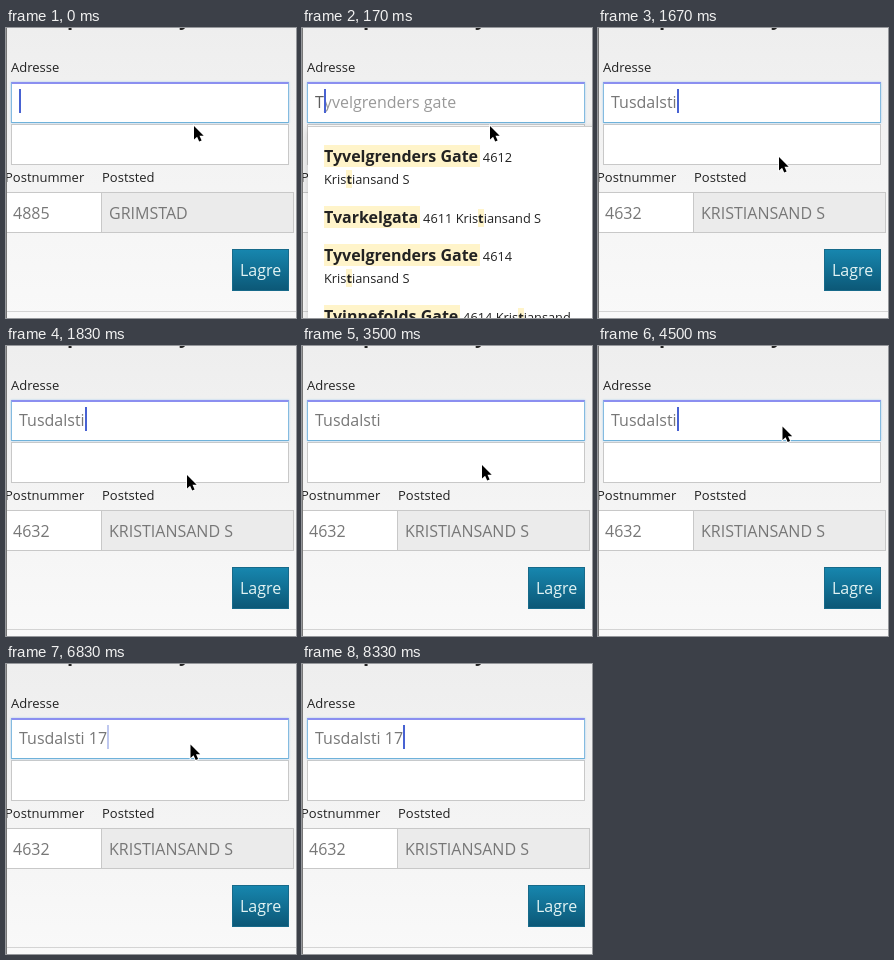
An HTML page for the animation above (8.67 s loop, 290 by 290 pixels).

```html
<!DOCTYPE html>
<html lang="no">
<head>
<meta charset="utf-8">
<title>Adresse</title>
<style>
html, body { margin: 0; width: 100%; height: 100%; overflow: hidden; }
#stage {
  position: relative; width: 290px; height: 290px; overflow: hidden;
  background: linear-gradient(#eee, #f9f9f9);
  font: 16px/22px "Open Sans", sans-serif; color: #222; white-space: pre;
}
#stage > *, .row { position: absolute; box-sizing: border-box; }
.title { top: -21px; font-size: 20px; }
.label { font-size: 13px; line-height: 18px; }
.box { border: 1px solid #c8c8c8; background: #fff; color: #777; padding: 9px 7px; height: 41px; }
#street {
  left: 5px; top: 54px; width: 278px; padding: 7px 7px 9px; border-color: #8b8ff0 #84bbe0 #6fb2da;
  border-top-width: 2px; box-shadow: 0 0 2px #a9cdf0;
}
#typed.hinted { color: #5e5e5e; }
#hint { color: #999; }
#caret {
  display: inline-block; position: relative; top: -3px; width: 2px; height: 24px;
  margin: -2px -2px -2px 0; vertical-align: -6px; background: #4862d2;
}
#save {
  left: 226px; top: 221px; width: 57px; height: 42px; padding: 9px 7px; border: 1px solid #176a8a;
  background: linear-gradient(#1786ae, #0c5877); color: #e2f3f3;
}
.list {
  left: 6px; top: 98px; width: 300px; height: 220px; background: #fff;
  border-top: 1px solid #ccc; box-shadow: 0 3px 8px rgba(0,0,0,.2);
}
.row { left: 16px; font-size: 12.8px; }
mark { background: #fff4ca; color: inherit; font-weight: bold; }
.row mark:first-child { font-size: 16px; padding-right: 1.5px; }
</style>
</head>
<body>
<div id="stage">
  <b class="title" style="left:61px">p</b>
  <b class="title" style="left:173px">y</b>
  <div style="left:0;top:283px;width:290px;height:1px;background:#d4d4d4"></div>
  <div class="label" style="left:5px;top:30px">Adresse</div>
  <div class="box" style="left:5px;top:96px;width:278px"></div>
  <div class="label" style="left:-1px;top:140px">Postnummer</div>
  <div class="label" style="left:96px;top:140px">Poststed</div>
  <div class="box" id="code" style="left:-1px;top:164px;width:97px"></div>
  <div class="box" id="town" style="left:95px;top:164px;width:193px;background:#ebebeb"></div>
  <div id="save">Lagre</div>
  <div class="box" id="street"><span id="typed"></span><i id="caret"></i><span id="hint"></span></div>
  <div class="list"></div>
  <div class="list"></div>
  <div style="left:0;top:0;width:1px;height:290px;background:#777"></div>
  <svg id="pointer" style="left:0;top:0;overflow:visible" width="12" height="18">
    <path d="M0 0V13.5L3.1 10.7L5.2 15.6L7.6 14.6L5.5 9.8H9.7Z" stroke="#fff" stroke-width="1.6" paint-order="stroke"/>
  </svg>
</div>
<script>
const LOOP = 8670;
const $ = id => document.getElementById(id);
const lists = document.querySelectorAll('.list');

// Suggestion rows: baseline, street, rest of the line
const city = 'Kris<mark>t</mark>iansand';
const rows = [
  [
    [134, 'Tyvelgrenders Gate', '4612'],
    [157, '', city + ' S'],
    [195, 'Tvarkelgata', `4611 ${city} S`],
    [233, 'Tyvelgrenders Gate', '4614'],
    [256, '', city + ' S'],
    [294, 'Tvinnefolds Gate', '4614 ' + city]
  ],
  [
    [134, 'Tusdalsti', '4632 Kristiansand S'],
    [172, 'Tusgreldsveien', '4632 Kristiansand S'],
    [211, 'Tusfokleveien', '4885 Grimstad'],
    [249, 'Tushultervegen', '3850 Kviteseid'],
    [288, 'Tusaveien', '4310 Hommersåk']
  ]
];
rows.forEach((set, i) => {
  lists[i].innerHTML = set.map(([y, name, rest]) =>
    `<div class="row" style="top:${y - 116}px">${name ? `<mark>${name}</mark> ` : '<span></span>'}${rest}</div>`
  ).join('');
});

// Each track holds its value from the given time on
const tracks = {
  text: [[0, '', ''], [170, 'T', 'yvelgrenders gate'], [330, 'Tu', 'sdalsti'], [500, 'Tus', 'dalsti'],
    [1170, 'Tus', ''], [1500, 'Tusdalsti', ''], [4830, 'Tusdalsti ', ''], [5170, 'Tusdalsti 17', '']],
  list: [[0, -1], [170, 0], [330, 1], [1500, -1]],
  post: [[0, '4885', 'GRIMSTAD'], [1670, '4632', 'KRISTIANSAND S']],
  caret: [[0, 1], [2000, .35], [2170, 0], [4500, 1], [6000, 0], [6330, 1], [6830, .35], [7000, 0],
    [7330, 1], [7830, .35], [8000, 0], [8330, 1]],
  pointer: [[0, 188, 98], [1000, 186, 113], [1170, 181, 129], [3500, 180, 119], [3670, 182, 96],
    [3830, 184.5, 80.5], [8170, -50, -50]]
};
const at = (name, t) => tracks[name].findLast(key => key[0] <= t).slice(1);

function draw(t) {
  const [typed, hint] = at('text', t);
  $('typed').textContent = typed;
  $('typed').className = hint ? 'hinted' : '';
  $('hint').textContent = hint;
  $('caret').style.opacity = at('caret', t)[0];
  const [open] = at('list', t);
  lists.forEach((list, i) => list.style.display = i === open ? 'block' : 'none');
  [$('code').textContent, $('town').textContent] = at('post', t);
  const [x, y] = at('pointer', t);
  $('pointer').style.transform = `translate(${x}px, ${y}px)`;
}

let start;
function tick(now) {
  start ??= now;
  draw((now - start) % LOOP);
  requestAnimationFrame(tick);
}
draw(0);
requestAnimationFrame(tick);
</script>
</body>
</html>
```
